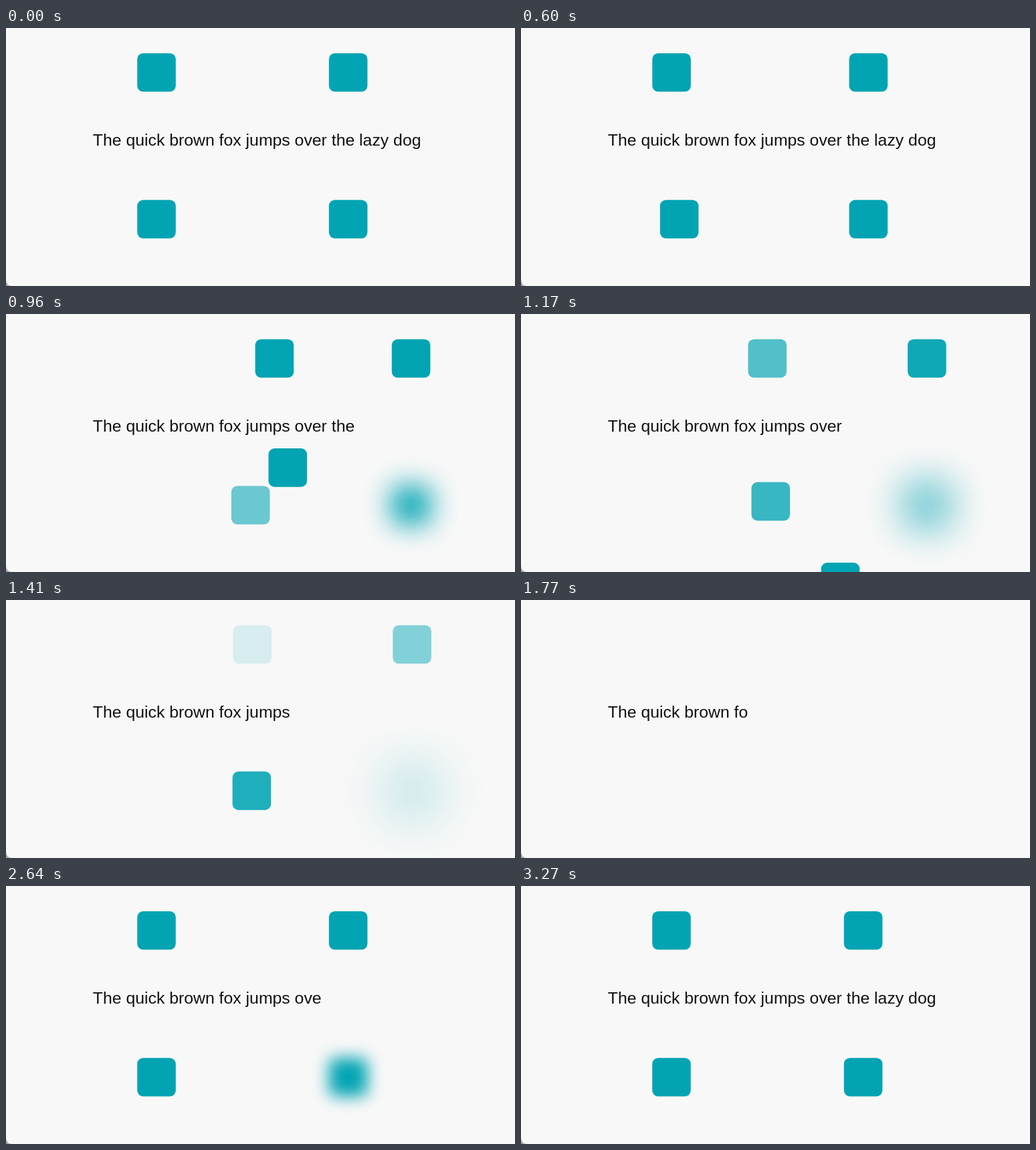
An HTML page for the animation above (4.05 s loop, 761 by 386 pixels).

```html
<!DOCTYPE html>
<html lang="en">
<head>
<meta charset="utf-8">
<title>Entrances and exits</title>
<style>
  html, body { margin: 0; width: 100%; height: 100%; overflow: hidden; background: #f8f8f8; }
  svg { display: block; }
  text { font: 24.8px "Liberation Sans", Arial, sans-serif; fill: #111; white-space: pre; }
</style>
</head>
<body>
<svg width="761" height="386" viewBox="0 0 761 386">
  <defs>
    <filter id="blur" filterUnits="userSpaceOnUse" x="-250" y="-250" width="500" height="500"
            color-interpolation-filters="sRGB">
      <feGaussianBlur stdDeviation="0"/>
    </filter>
  </defs>
  <rect width="761" height="386" fill="#f8f8f8"/>
  <path d="M0 376Q0 386 10 386H0Z" fill="#a6a6a6"/>
  <text x="129.8" y="176"></text>
  <g id="squares" fill="#02a4b3"></g>
</svg>
<script>
const LOOP = 4050, TICK = 30, SPAN = 636;
const LEFT = 225, RIGHT = 511.6, TOP = 66.5, BOTTOM = 286, SIZE = 57.6;
const MAX_BLUR = 41;
const PHRASE = "The quick brown fox jumps over the lazy dog";
const SVG = "http://www.w3.org/2000/svg";
const label = document.querySelector("text");
const blurNode = document.querySelector("feGaussianBlur");

const clamp = x => Math.min(1, Math.max(0, x));
const progress = (t, start, span) => clamp((t - start) / span);
const smooth = x => x * x * (3 - 2 * x);

function elasticOut(x) {
  if (x <= 0 || x >= 1) return x;
  return 1 - 2 ** (-10 * x) * Math.cos(2 * Math.PI * x / 0.3);
}

function elasticInOut(x) {
  if (x <= 0 || x >= 1) return x;
  const amp = 1.45, period = 0.5, u = Math.abs(2 * x - 1);
  const wave = amp / 2 * 2 ** (-10 * u) * Math.cos(Math.acos(1 / amp) + 2 * Math.PI * u / period);
  return x < 0.5 ? wave : 1 - wave;
}

function makeSquare() {
  const node = document.createElementNS(SVG, "rect");
  const attrs = { x: -SIZE / 2, y: -SIZE / 2, width: SIZE, height: SIZE, rx: 9 };
  for (const key in attrs) node.setAttribute(key, attrs[key]);
  document.getElementById("squares").append(node);
  return node;
}

const [slide, spring, fly1, fly2, fly3, haze] = Array.from({ length: 6 }, makeSquare);

function place(node, x, y, opacity, scale = 1) {
  node.setAttribute("transform", `translate(${x} ${y}) scale(${scale})`);
  node.setAttribute("opacity", opacity);
}

function setBlur(sigma) {
  if (sigma > 0.1) {
    blurNode.setAttribute("stdDeviation", sigma);
    haze.setAttribute("filter", "url(#blur)");
  } else haze.removeAttribute("filter");
}

// Flies to the centre from an offset while fading out.
function fly(node, t, start, span, dx, dy) {
  const rest = 1 - elasticOut(progress(t, start, span));
  const fade = 1 - progress(t, start, 466) ** 3.5;
  place(node, LEFT + 143 + dx * rest, BOTTOM + dy * rest, fade);
}

function render(t) {
  const erased = (t - 600) / 47, untyped = (3265 - t) / 47;
  const count = PHRASE.length - Math.max(0, Math.min(erased, untyped));
  label.textContent = PHRASE.slice(0, Math.floor(count));

  if (t < 2040) {
    place(slide, LEFT + 143.3 * elasticInOut(progress(t, 594, SPAN)), TOP,
      1 - smooth(progress(t, 930, 624)));
  } else {
    place(slide, LEFT, TOP, 1, elasticInOut(progress(t, 2041, 624)));
  }

  const out = t < 2150;
  const zoom = progress(t, 2170, 470);
  const shift = 95.5 * elasticOut(progress(t, 594, SPAN));
  const fade = 1 - smooth(progress(t, 1082, SPAN));

  if (out) {
    place(spring, RIGHT + shift, TOP, fade);
    place(haze, RIGHT + shift, BOTTOM, fade);
    setBlur(MAX_BLUR * progress(t, 594, 750));
    fly(fly1, t, 594, SPAN, -143, 0);
  } else {
    place(spring, RIGHT, TOP, zoom, 0.3 + 0.7 * zoom);
    place(fly1, LEFT, BOTTOM, zoom, 0.3 + 0.7 * zoom);
    place(haze, RIGHT, BOTTOM, smooth(progress(t, 2280, 360)));
    setBlur(MAX_BLUR * (1 - progress(t, 2150, 690)));
  }

  fly(fly2, t, 866, 650, -146, 154);
  fly(fly3, t, 1155, 675, 143, 150);
  if (t < 866) fly2.setAttribute("opacity", 0);
  if (t < 1155) fly3.setAttribute("opacity", 0);
}

const begin = performance.now();
function frame() {
  const t = (performance.now() - begin) % LOOP;
  render(Math.floor(t / TICK) * TICK);
  requestAnimationFrame(frame);
}
frame();
</script>
</body>
</html>
```
